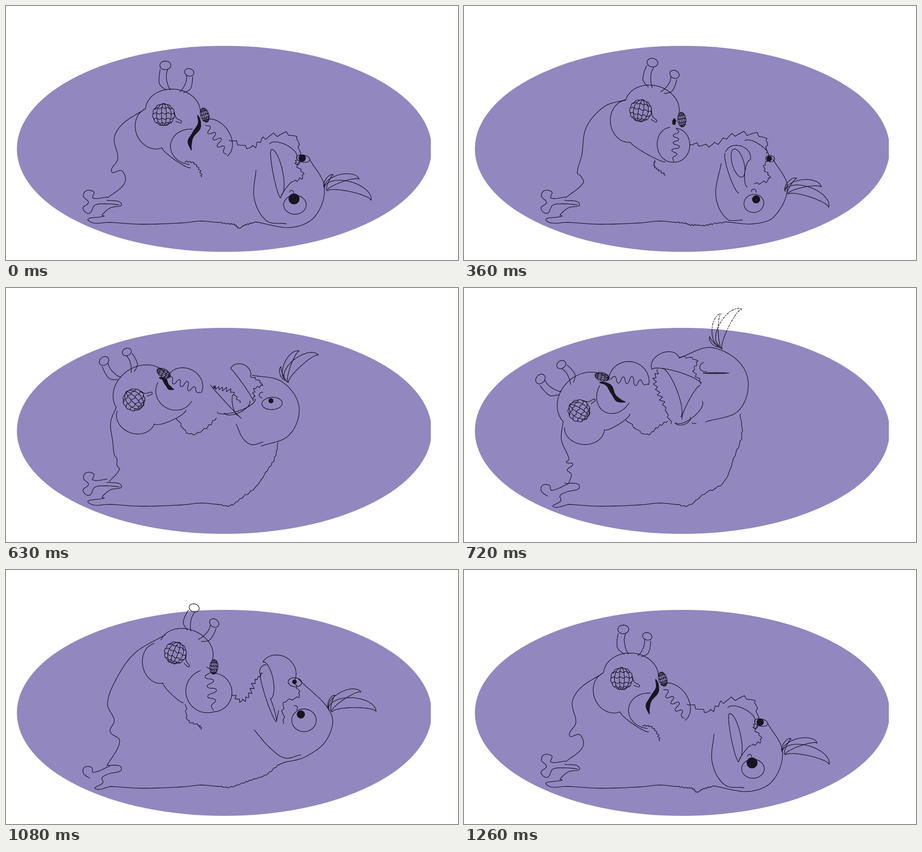
An HTML page with a canvas that plays this animation: 998 by 561 pixels, repeating every 1350 ms.

```html
<!DOCTYPE html>
<html lang="en">
<head>
<meta charset="utf-8">
<title>Two creatures</title>
<style>
html, body { margin: 0; width: 100%; height: 100%; overflow: hidden; background: #fff; }
canvas { display: block; }
</style>
</head>
<body>
<canvas id="stage" width="998" height="561"></canvas>
<script>
const ctx = document.getElementById('stage').getContext('2d');
const STEP = 90, STEPS = 15, INK = '#17151f';

// Key poses of the rig. Curves hold x,y points; arcs hold x1,y1,x2,y2,bulge;
// horns and teeth hold root and tip; the crest holds a root and three tips.
const lying = {
  at: 0, foot: 'bone',
  back: [308,227, 258,260, 239,292, 247,337, 233,366, 256,364, 262,391, 224,424],
  crown: [308,227, 429,237, .4], cheek: [308,227, 345,313, -.43], jowl: [345,313, 408,357, -.08],
  leftHorn: [358,186, 356,122], rightHorn: [388,191, 403,138],
  eye: [348,240, .4], farEye: [439,241],
  lower: [412,272, 405,350, -.58], upper: [434,254, 488,332, .36],
  teeth: [440,264, 487,328], stripe: [423,240, 410,320, 6],
  ruff: [394,344, 412,346, 426,360, 432,378],
  comb: [492,296, 543,313, 572,291, 637,288, 649,330],
  skull: [670,338, 703,400, 682,465, 630,489, 552,477],
  breast: [552,362, 548,425, 575,474, 619,481],
  belly: [490,481, 505,483, 514,491, 525,485, 538,481, 552,477],
  bill: [[582,305, 642,335, .22], [586,317, 607,424, -.06], [586,317, 607,418, .14],
    [607,424, 633,388, .08], [648,335, 641,350, .2], [651,339, 643,352, .1]],
  nose: [642,335, 640,350, 656,374, 634,388],
  brow: [626,412, 635,413, .6],
  birdEye: [638,439, 25,21, 0, 636,426, 12], birdFarEye: [656,337, 15,8, .2, 654,336, 8],
  crest: [706,405, 723,373, 780,383, 806,430]
};
const facing = {
  at: 4, foot: 'bone',
  back: [357,207, 310,222, 270,268, 260,330, 250,368, 258,376, 263,391, 224,424],
  crown: [357,208, 474,240, .4], cheek: [357,208, 368,301, -.42], jowl: [368,301, 445,344, -.06],
  leftHorn: [411,180, 422,117], rightHorn: [438,192, 465,142],
  eye: [390,231, .6], farEye: [481,251],
  lower: [455,268, 463,345, -.42], upper: [468,270, 463,345, .44],
  teeth: [468,270, 463,343], stripe: [464,248, 464,263, 5],
  ruff: [421,340, 420,354, 430,363, 445,374],
  comb: [498,306, 550,307, 598,284, 664,292, 667,326],
  skull: [682,338, 714,400, 685,465, 640,481, 580,477],
  breast: [568,347, 556,420, 580,470, 615,473],
  belly: [488,480, 500,484, 515,484, 530,485, 552,481, 580,477],
  bill: [[620,298, 672,332, .18], [577,325, 607,413, -.08], [578,322, 632,340, .4],
    [596,316, 614,378, -.2], [632,340, 626,400, -.15], [596,316, 614,378, .2]],
  nose: [672,335, 662,358, 674,381, 640,393],
  brow: [634,410, 645,412, .6],
  birdEye: [640,436, 22,20, -.2, 645,427, 9], birdFarEye: [676,337, 10,7, .2, 674,337, 6],
  crest: [712,412, 735,381, 789,400, 805,445]
};
const rising = {
  at: 6, foot: 'bone',
  back: [267,233, 247,260, 240,305, 252,350, 250,368, 262,380, 263,392, 224,424],
  crown: [269,234, 388,180, .4], cheek: [269,234, 345,287, -.43], jowl: [345,287, 428,260, -.13],
  leftHorn: [288,168, 265,112], rightHorn: [321,161, 314,106],
  eye: [311,223, -.12], farEye: [391,180],
  lower: [371,202, 455,247, -.34], upper: [397,190, 454,249, .38],
  teeth: [387,198, 453,250], stripe: [377,187, 385,197, 5],
  ruff: [395,285, 410,322, 457,311, 480,280],
  comb: [495,255, 498,235, 528,212, 558,200, 576,208],
  skull: [613,230, 670,283, 672,340, 640,383, 592,403],
  breast: [514,303, 540,365, 575,393, 623,380],
  belly: [495,481, 510,473, 527,453, 555,437, 572,430, 592,404],
  bill: [[577,176, 605,240, .45], [577,177, 569,288, -.03], [466,250, 562,291, -.15],
    [466,250, 575,240, -.1], [483,255, 541,272, -.2], [497,254, 576,213, -.15]],
  nose: [607,240, 616,265, 590,262, 570,283],
  brow: [595,302, 606,297, .6],
  birdEye: [619,322, 16,26, -.1, 614,310, 11], birdFarEye: [612,240, 0,0, 0, 612,240, 0],
  crest: [673,280, 673,240, 728,222, 766,250]
};
const yawning = {
  at: 8, foot: 'folded',
  back: [219,295, 215,335, 232,378, 226,385, 240,389, 228,402, 237,411, 231,432],
  crown: [219,295, 320,202, .42], cheek: [222,308, 310,313, -.4], jowl: [310,313, 366,278, -.1],
  leftHorn: [212,233, 165,192], rightHorn: [239,211, 207,165],
  eye: [254,271, -.61], farEye: [305,196],
  lower: [300,215, 365,253, -.6], upper: [320,197, 408,214, .48],
  teeth: [323,202, 407,212], stripe: [298,208, 358,252, 6],
  ruff: [357,292, 403,324, 427,308, 450,294],
  comb: [427,180, 420,205, 430,235, 442,262, 457,300],
  skull: [474,155, 550,132, 622,185, 610,267, 533,296],
  breast: [503,298, 506,299, 510,299, 513,300],
  belly: [495,481, 530,455, 573,430, 598,370, 614,325, 610,278],
  bill: [[415,180, 474,152, .36], [415,180, 523,212, .1], [437,178, 478,285, .12],
    [466,297, 526,250, -.2], [522,215, 482,290, -.08], [466,297, 500,285, -.3]],
  nose: [474,152, 513,160, 507,183, 524,210],
  brow: [536,184, 530,164, .6],
  birdEye: [556,188, 29,1, 0, 556,188, 0], birdFarEye: [490,154, 0,0, 0, 490,154, 0],
  crest: [567,131, 543,107, 568,57, 614,47]
};
const pecking = {
  at: 10, foot: 'folded',
  back: [189,262, 180,300, 193,345, 212,381, 227,392, 236,413, 224,418, 231,432],
  crown: [190,260, 300,175, .42], cheek: [190,268, 282,284, -.4], jowl: [282,284, 338,260, -.1],
  leftHorn: [190,195, 149,148], rightHorn: [217,177, 194,127],
  eye: [228,237, -.44], farEye: [287,169],
  lower: [281,190, 350,231, -.56], upper: [303,172, 388,190, .45],
  teeth: [303,178, 390,189], stripe: [279,183, 341,231, 6],
  ruff: [335,262, 365,307, 407,325, 440,290],
  comb: [374,234, 384,248, 410,262, 416,276, 441,290],
  skull: [390,160, 465,95, 515,100, 562,155, 569,205],
  breast: [559,165, 562,195, 545,230, 508,250],
  belly: [495,481, 530,455, 573,430, 599,365, 599,280, 569,205],
  bill: [[390,186, 390,160, -.1], [344,230, 440,213, -.05], [344,230, 443,200, .09],
    [440,213, 443,200, 0], [388,186, 393,168, .1], [321,186, 331,218, .1]],
  nose: [390,160, 433,155, 424,182, 445,193],
  brow: [448,145, 454,136, .2],
  birdEye: [483,148, 30,14, -.2, 473,151, 6], birdFarEye: [405,155, 0,0, 0, 405,155, 0],
  crest: [465,92, 433,80, 434,22, 495,13]
};
const falling = {
  at: 12, foot: 'folded',
  back: [352,143, 285,183, 245,238, 224,295, 239,332, 230,357, 251,378, 223,432],
  crown: [342,155, 455,200, .38], cheek: [328,162, 347,250, -.4], jowl: [347,250, 392,293, -.08],
  leftHorn: [404,134, 422,77], rightHorn: [428,156, 461,108],
  eye: [374,183, .78], farEye: [459,214],
  lower: [430,222, 460,313, -.5], upper: [456,228, 460,313, .48],
  teeth: [443,214, 458,310], stripe: [444,216, 445,218, 0],
  ruff: [396,296, 402,333, 425,343, 432,352],
  comb: [498,275, 522,290, 540,271, 551,245, 567,228],
  skull: [645,240, 718,318, 708,375, 660,413, 615,425],
  breast: [548,353, 580,390, 615,415, 651,408],
  belly: [495,480, 525,470, 545,463, 575,452, 600,432, 615,425],
  bill: [[567,203, 635,248, .45], [567,203, 583,285, .18], [583,285, 597,335, .05],
    [575,210, 562,230, -.3], [562,230, 597,335, -.05], [597,335, 602,310, 0]],
  nose: [635,248, 647,277, 614,293, 613,340],
  brow: [641,309, 636,300, -.5],
  birdEye: [658,332, 27,25, 0, 651,319, 9], birdFarEye: [638,248, 15,10, .1, 637,247, 5],
  crest: [716,310, 727,277, 784,270, 817,313]
};
const poses = [lying, facing, rising, yawning, pecking, falling, { ...lying, at: 14 }];

const ground = [232,478, 300,482, 390,479, 430,475, 468,478];
const feet = {
  bone: [
    [224,422, 192,424, 194,411, 177,408, 171,420, 182,434, 170,447, 184,458, 196,440, 220,437, 250,439],
    [222,429, 255,437, 230,446, 212,462, 217,464, 182,474, 232,478]
  ],
  folded: [
    [231,432, 193,447, 189,436, 173,436, 171,449, 185,460],
    [222,431, 255,438, 225,451, 212,459, 214,470, 197,483, 232,478]
  ]
};

const mix = (a, b, k) => Array.isArray(a) ? a.map((v, i) => mix(v, b[i], k)) : a + (b - a) * k;
const noise = i => Math.abs(Math.sin(i * 127.1 + 3.7) * 43758.5) % 1;
const range = (n, fn) => Array.from({ length: n + 1 }, (_, i) => fn(i / n, i));
const pairs = flat => range(flat.length / 2 - 1, (_, i) => [flat[2 * i], flat[2 * i + 1]]);

// Point at t along a segment, moved s lengths to its left.
const beside = ([x1, y1, x2, y2], t, s) =>
  [x1 + (x2 - x1) * t + (y2 - y1) * s, y1 + (y2 - y1) * t - (x2 - x1) * s];

function spline(points) {
  const at = i => points[Math.max(0, Math.min(points.length - 1, i))];
  const line = [points[0]];
  for (let i = 0; i < points.length - 1; i++) {
    const [a, b, c, d] = [at(i - 1), at(i), at(i + 1), at(i + 2)];
    const reach = Math.hypot(c[0] - b[0], c[1] - b[1]);
    const slope = (p, q) => {
      const len = Math.hypot(q[0] - p[0], q[1] - p[1]) || 1;
      return [(q[0] - p[0]) / len * reach, (q[1] - p[1]) / len * reach];
    };
    const u = slope(a, c), v = slope(b, d);
    for (let t = .1; t < 1.05; t += .1) {
      const e = t * t * (3 - 2 * t), f = t * (1 - t) ** 2, g = t * t * (t - 1);
      line.push([0, 1].map(n => b[n] + (c[n] - b[n]) * e + u[n] * f + v[n] * g));
    }
  }
  return line;
}

// Feathered edge: teeth of uneven length grow to the left of the curve.
function ruffle(line, size) {
  return line.map((p, i) => {
    const q = line[i + 1];
    if (!i || !q) return p;
    const len = Math.hypot(q[0] - p[0], q[1] - p[1]) || 1;
    const push = size * (i % 4 / 3 - .4) * (.4 + noise(i >> 2));
    return [p[0] + (q[1] - p[1]) / len * push, p[1] - (q[0] - p[0]) / len * push];
  });
}

const arc = ([x1, y1, x2, y2, bulge]) => range(24, t =>
  beside([x1, y1, x2, y2], (1 - Math.cos(t * Math.PI)) / 2, bulge * Math.sin(t * Math.PI)));

const oval = (x, y, rx, ry, turn = 0) => {
  const path = new Path2D();
  path.ellipse(x, y, rx, ry, turn, 0, Math.PI * 2);
  return path;
};

function horn(axis, side) {
  const edge = (...flat) => spline(pairs(flat).map(([t, s]) => beside(axis, t, s * side)));
  const knob = range(20, t => beside(axis,
    .86 + .15 * Math.sin(t * 2 * Math.PI), (.07 + .19 * Math.cos(t * 2 * Math.PI)) * side));
  return [edge(.73, .25, .45, .3, .2, .28, 0, .06), edge(.72, 0, .48, .05, .17, 0, 0, -.08), knob];
}

const teeth = axis => spline(range(9, (t, i) =>
  beside(axis, t, i && i < 9 ? (i % 2 ? .09 : -.05) * (.6 + noise(i)) : 0)));

// Wavy blot that tapers to its ends; short ones become a dot.
function blot([x1, y1, x2, y2, width]) {
  const axis = [x1, y1, x2, y2], len = Math.hypot(x2 - x1, y2 - y1);
  const rim = side => range(24, t => beside(axis, t,
    .09 * Math.sin(t * 2 * Math.PI) * Math.min(1, len / 50) +
    side * width / len * Math.sqrt(Math.sin(t * Math.PI)) * (.85 + .15 * Math.cos(t * 16))));
  return [...rim(1), ...rim(-1).reverse()];
}

// Compound eye: an uneven globe with meridians and wavy parallels.
function globe(cx, cy, rx, ry, turn) {
  const c = Math.cos(turn), s = Math.sin(turn);
  const curve = fn => range(40, t => {
    const [u, v] = fn(t * 2 - 1);
    return [cx + u * rx * c - v * ry * s, cy + u * rx * s + v * ry * c];
  });
  const rim = curve(t => {
    const a = t * Math.PI, r = 1 + .04 * Math.sin(a * 11);
    return [r * Math.cos(a), r * Math.sin(a)];
  });
  const meridians = [-.65, -.2, .25, .7].map(k => curve(t => [k * Math.sqrt(1 - t * t), t]));
  const parallels = [-.55, -.1, .35, .7].map(k => curve(t =>
    [t * Math.sqrt(1 - k * k), k + .12 * (1 - t * t) * k + .06 * Math.sin(t * 11)]));
  return [rim, ...meridians, ...parallels];
}

function mothEye([x, y, turn]) {
  const ray = (r, a) => [x + r * Math.cos(turn + a), y + r * Math.sin(turn + a)];
  return [...globe(x, y, 24, 24, turn - .4), spline([ray(24, -.75), ray(29, -.15), ray(43, 0), ray(30, .1)])];
}

function feather(x, y, tipX, tipY, spread) {
  return [arc([x - spread, y - spread, tipX, tipY, .26]), arc([x + spread, y + spread, tipX, tipY, .1])];
}

function buildFrame(step) {
  const i = poses.findLastIndex(p => p.at <= step);
  const from = poses[i], to = poses[i + 1] || from;
  const k = to === from ? 0 : (step - from.at) / (to.at - from.at);
  const p = {};
  for (const part in from) p[part] = part === 'foot' ? from.foot : mix(from[part], to[part], k);

  const curve = flat => spline(pairs(flat));
  const [rootX, rootY, ...tips] = p.crest;
  const lines = [
    ...feet[p.foot].map(curve), curve(ground), curve(p.back),
    ...[p.crown, p.cheek, p.jowl, p.lower, p.upper, p.brow, ...p.bill].map(arc),
    ...horn(p.leftHorn, 1), ...horn(p.rightHorn, -1), teeth(p.teeth),
    ...mothEye(p.eye), ...globe(...p.farEye, 9, 16, p.eye[2] - .7),
    ruffle(curve(p.ruff), 3), ruffle(curve(p.comb), 7), ruffle(curve(p.nose), 4),
    ruffle(curve([468, 478, ...p.belly]), 2), curve(p.skull), curve(p.breast),
    ...pairs(tips).flatMap(([x, y], n) => feather(rootX, rootY, x, y, 2 + n))
  ];
  const ink = new Path2D(), solid = new Path2D();
  for (const line of lines) line.forEach(([x, y], n) => n ? ink.lineTo(x, y) : ink.moveTo(x, y));
  if (p.stripe[4]) blot(p.stripe).forEach(([x, y], n) => n ? solid.lineTo(x, y) : solid.moveTo(x, y));
  for (const [x, y, rx, ry, turn, px, py, pr] of [p.birdEye, p.birdFarEye]) {
    if (rx) ink.addPath(oval(x, y, rx, ry, turn));
    if (pr) solid.addPath(oval(px, py, pr, Math.min(pr, ry)));
  }
  return { ink, solid, broken: step > 4 && step < 12 };
}

const backdrop = oval(482, 315.5, 458, 227.5);
const outside = new Path2D(backdrop);
outside.rect(0, 0, 998, 561);
const frames = range(STEPS - 1, (_, i) => buildFrame(i));

function strokeWithin(region, ink, dash) {
  ctx.save();
  ctx.clip(region, 'evenodd');
  ctx.setLineDash(dash);
  ctx.stroke(ink);
  ctx.restore();
}

function draw(time) {
  const { ink, solid, broken } = frames[Math.floor(time / STEP) % STEPS];
  ctx.fillStyle = '#fff';
  ctx.fillRect(0, 0, 998, 561);
  ctx.fillStyle = '#9287bf';
  ctx.fill(backdrop);
  ctx.clearRect(938, 0, 60, 561);
  ctx.strokeStyle = ctx.fillStyle = INK;
  ctx.lineJoin = 'round';
  ctx.lineWidth = 1.3;
  strokeWithin(backdrop, ink, []);
  strokeWithin(outside, ink, broken ? [6, 2, 3, 2] : []);
  ctx.fill(solid);
}

const start = performance.now();
function tick() {
  draw(performance.now() - start);
  requestAnimationFrame(tick);
}
tick();
</script>
</body>
</html>
```
